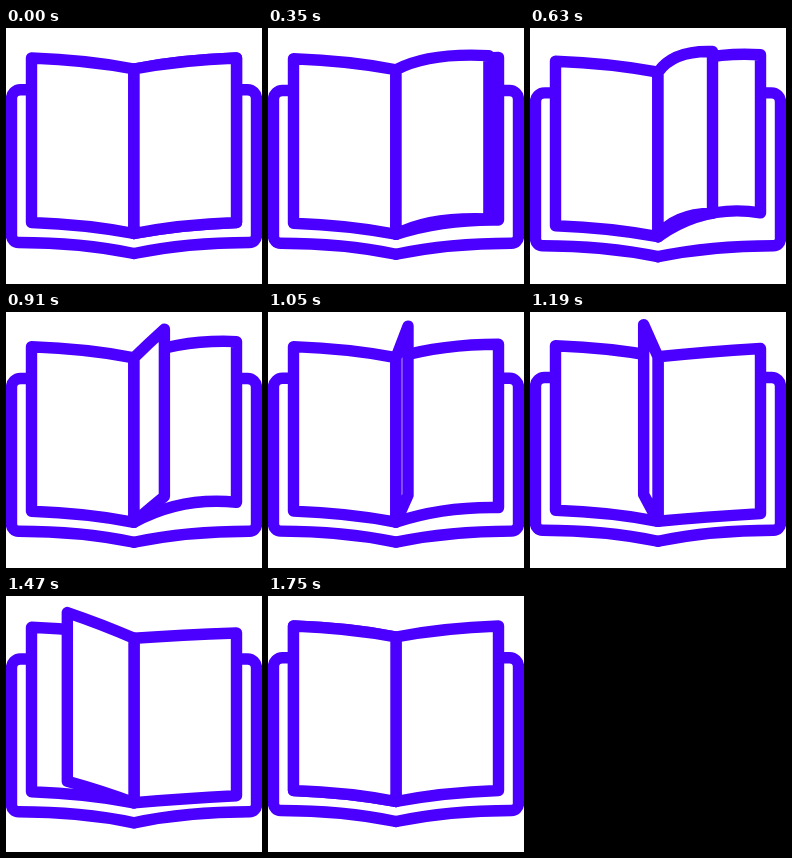
Animation, 256 px wide and 256 px high, one loop 1.96 s. Source, as an HTML page with a canvas:

```html
<!DOCTYPE html>
<html lang="en">
<head>
<meta charset="utf-8">
<title>Turning page</title>
<style>
html, body { margin: 0; width: 100%; height: 100%; overflow: hidden; background: #fff; }
canvas { display: block; width: 256px; height: 256px; }
</style>
</head>
<body>
<canvas id="stage" width="256" height="256"></canvas>
<script>
const ctx = document.getElementById('stage').getContext('2d');
const { PI, sin, cos, max } = Math;
const INK = '#4b00ff';
const LOOP = 1960, STEP = 70, START = 140, END = 1750;
const SPINE = 128, REACH = 102.5;
const TOP = 30, BOTTOM = 194.5, SPINE_TOP = 41, SPINE_BOTTOM = 205.5;
const REST_CURL = 4, REST_LEAN = 0.46;

// Control point of an arched edge: a point on the straight edge, raised by the curl
function bend(spineY, x, y, curl, lean) {
  return [SPINE + (x - SPINE) * lean, spineY + (y - spineY) * lean - curl];
}

function page(x, top, bottom, topCurl = REST_CURL, bottomCurl = topCurl, lean = REST_LEAN) {
  ctx.beginPath();
  ctx.moveTo(SPINE, SPINE_TOP);
  ctx.quadraticCurveTo(...bend(SPINE_TOP, x, top, topCurl, lean), x, top);
  ctx.lineTo(x, bottom);
  ctx.quadraticCurveTo(...bend(SPINE_BOTTOM, x, bottom, bottomCurl, lean), SPINE, SPINE_BOTTOM);
  ctx.closePath();
  ctx.fill();
  ctx.stroke();
}

function cover() {
  const left = 5.5, top = 61.7, bottom = 214.5;
  for (const side of [1, -1]) {
    const at = x => SPINE + side * (x - SPINE);
    ctx.beginPath();
    ctx.moveTo(at(22), top);
    ctx.arcTo(at(left), top, at(left), bottom, 9);
    ctx.arcTo(at(left), bottom, at(40), bottom, 7);
    ctx.quadraticCurveTo(at(75), bottom, SPINE, 225.5);
    ctx.stroke();
  }
}

function leftPage() {
  page(SPINE - REACH, TOP, BOTTOM);
}

// The right page is lifted by the turning one, then sinks and settles
function rightPage(angle) {
  const sway = sin(angle) ** 2 * sin(2 * angle);
  const topLift = 10 * sway;
  const bottomLift = (14 + 11 * cos(angle)) * sway;
  const curl = lift => max(1, REST_CURL + 1.4 * lift);
  page(SPINE + REACH, TOP - topLift, BOTTOM - bottomLift, curl(topLift), curl(bottomLift));
}

function turningPage(u, angle) {
  const arch = max(0, sin(2 * PI * u)) ** 2;
  const curl = 17 * arch + REST_CURL * cos(angle) ** 2;
  const topLift = 18.5 * sin(PI * u) - 5.8 * sin(2 * PI * u);
  const bottomLift = 16 * max(0, sin(angle)) ** 1.5;
  page(SPINE + REACH * cos(angle), TOP - topLift, BOTTOM - bottomLift,
    curl, curl, REST_LEAN - 0.2 * arch);
}

// Half a turn with a slower middle
function turnAngle(u) {
  const wave = n => sin(n * PI * u);
  return PI * (u - 0.071 * wave(1) + 0.066 * wave(2) - 0.013 * wave(5));
}

function draw(time) {
  const u = Math.min(1, max(0, (time - START) / (END - START)));
  const angle = turnAngle(u);
  ctx.fillStyle = '#fff';
  ctx.fillRect(0, 0, 256, 256);
  ctx.strokeStyle = INK;
  ctx.lineWidth = 11.4;
  ctx.lineJoin = ctx.lineCap = 'round';
  ctx.save();
  ctx.translate(0, 4.8 * sin(PI * u) ** 2);
  cover();
  leftPage();
  rightPage(angle);
  turningPage(u, angle);
  ctx.restore();
}

function tick() {
  const time = performance.now() % LOOP;
  draw(Math.floor(time / STEP) * STEP);
  requestAnimationFrame(tick);
}
tick();
</script>
</body>
</html>
```
